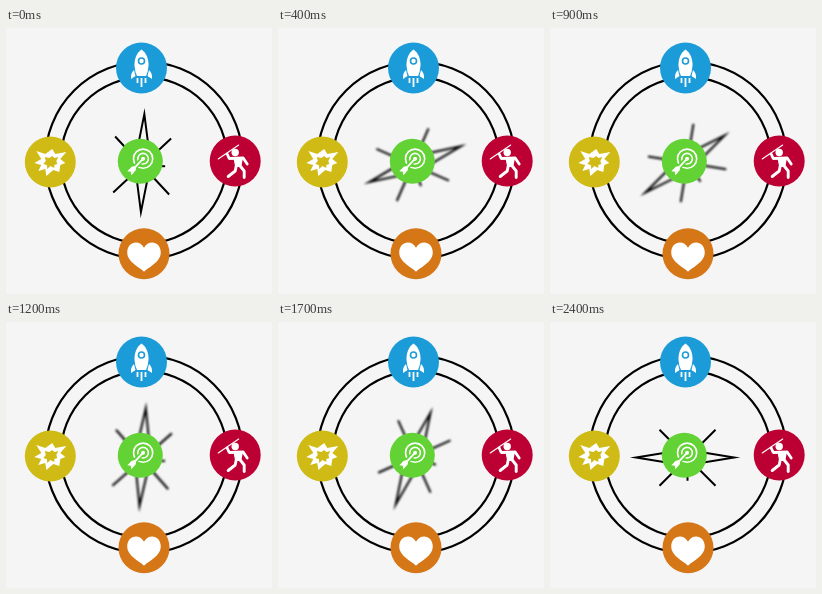
An HTML page with a canvas that plays this animation: 266x266 px, repeating every 4000 ms.

```html
<!DOCTYPE html>
<html lang="en">
<head>
<meta charset="utf-8">
<title>Compass</title>
<style>
  html, body { margin: 0; width: 100%; height: 100%; overflow: hidden; background: #f5f5f5; }
  canvas { display: block; width: 266px; height: 266px; }
</style>
</head>
<body>
<canvas id="stage"></canvas>
<script>
const SIZE = 266, LOOP = 4000, STEP = 100, SPIN_END = 2400;
const WHITE = '#fff', BLACK = '#000', BACK = '#f5f5f5';
const BLUE = '#1c9bd9', GOLD = '#cfba16', RED = '#bd0034', ORANGE = '#d57617', GREEN = '#62d234';

const canvas = document.getElementById('stage');
const ctx = canvas.getContext('2d');
const ratio = window.devicePixelRatio || 1;
canvas.width = canvas.height = Math.round(SIZE * ratio);

function fill(path, color) {
  ctx.fillStyle = color;
  ctx.fill(new Path2D(path));
}

function stroke(path, color, width) {
  ctx.strokeStyle = color;
  ctx.lineWidth = width;
  ctx.stroke(new Path2D(path));
}

function disc(x, y, r, color) {
  ctx.fillStyle = color;
  ctx.beginPath();
  ctx.arc(x, y, r, 0, Math.PI * 2);
  ctx.fill();
}

function ring(x, y, r, color, width) {
  ctx.strokeStyle = color;
  ctx.lineWidth = width;
  ctx.beginPath();
  ctx.arc(x, y, r, 0, Math.PI * 2);
  ctx.stroke();
}

// Draws with the origin moved to (x, y)
function at(x, y, draw) {
  ctx.save();
  ctx.translate(x, y);
  draw();
  ctx.restore();
}

// Needle angle in degrees: speeds up to the middle of the spin, then settles
function needleAngle(t) {
  const half = SPIN_END / 2;
  if (t < half) return 2 + 361.7 * (t / half) ** 1.54;
  return 630 - 266.3 * Math.max(0, (SPIN_END - t) / half) ** 2.5;
}

function cross() {
  stroke('M-28 -28L28 28M28 -28L-28 28M-23 0H23', BLACK, 2);
}

function diamond() {
  const path = 'M0 -49L8 0L0 49L-8 0Z';
  fill(path, BACK);
  stroke(path, BLACK, 2);
}

// Cross and diamond sit slightly off the pivot, so they wobble as they turn
function needle(t) {
  const moving = t > 0 && t < SPIN_END;
  ctx.save();
  if (moving) ctx.filter = `blur(${0.8 * ratio}px)`;
  ctx.translate(136, 136);
  ctx.rotate(needleAngle(t) * Math.PI / 180);
  at(0.2, 1.5, cross);
  at(0.6, -0.9, diamond);
  ctx.restore();
}

function rocket() {
  disc(0, 0, 25.5, BLUE);
  fill('M0 -18.5C5 -15 7.3 -9 7 -2Q6.5 4 4.5 8H-4.5Q-6.5 4 -7 -2C-7.3 -9 -5 -15 0 -18.5Z', WHITE);
  fill('M-7.5 2Q-11 5 -10.5 11L-6 8ZM7.5 2Q11 5 10.5 11L6 8Z', WHITE);
  ring(0, -7, 3, BLUE, 1.6);
  stroke('M-4 10V15M0 10V19M4 10V15', WHITE, 1.8);
}

function burst() {
  disc(0, 0, 25.5, GOLD);
  fill('M-14 -11L-5 -8L2 -13L5 -8L16 -10L10 -3L15 1L10 3L9 10L3 8L-4 14L-5 7L-12 9L-9 3L-16 1L-9 -3Z', WHITE);
  fill('M-5.5 -5L-1 -4L2 -6L4 -4L8 -5L6 -1L7 2L4 3L4 6L0 4L-3 7L-3.5 3L-7 2L-4.5 -1Z', GOLD);
}

function thrower() {
  disc(0, 0, 25.5, RED);
  ctx.lineCap = ctx.lineJoin = 'round';
  stroke('M-17 -2L3.5 -16', WHITE, 1.1);
  disc(0, -8.5, 3.7, WHITE);
  stroke('M-8 -7L-6 -2.5L8 -3L12 3', WHITE, 2.8);
  fill('M-2 -4L8 -4L6 6L0 6Z', WHITE);
  stroke('M1 5L0 10L-7 15.5M5 5L9 10L9 16.5', WHITE, 2.9);
}

function heart() {
  disc(0, 0, 25.5, ORANGE);
  fill('M0 18C-5 13 -16.8 8 -16.8 -1C-16.8 -12.5 -4.5 -14.5 0 -6C4.5 -14.5 16.8 -12.5 16.8 -1C16.8 8 5 13 0 18Z', WHITE);
}

function target() {
  disc(0, 0, 22.5, GREEN);
  ring(2.8, -2.6, 9.6, WHITE, 1.6);
  ring(2.8, -2.6, 5.3, WHITE, 1.6);
  disc(2.8, -2.6, 2, WHITE);
  stroke('M1 -0.8L-12 13', GREEN, 5);
  stroke('M2.8 -2.6L-8 9', WHITE, 1.8);
  fill('M-4 4.5L-4.5 9L-9 14L-9.5 10.5L-13 10L-8.5 5.5Z', WHITE);
}

function render(t) {
  ctx.setTransform(ratio, 0, 0, ratio, 0, 0);
  ctx.fillStyle = BACK;
  ctx.fillRect(0, 0, SIZE, SIZE);
  ring(138, 132.4, 98.8, BLACK, 2.2);
  ring(138, 132.3, 83.2, BLACK, 2.2);
  needle(t);
  at(135.5, 40, rocket);
  at(44.3, 134, burst);
  at(229.2, 133, thrower);
  at(138, 225.8, heart);
  at(134.3, 133.3, target);
}

function tick() {
  const t = performance.now() % LOOP;
  render(Math.min(Math.floor(t / STEP) * STEP, SPIN_END));
  requestAnimationFrame(tick);
}
tick();
</script>
</body>
</html>
```
